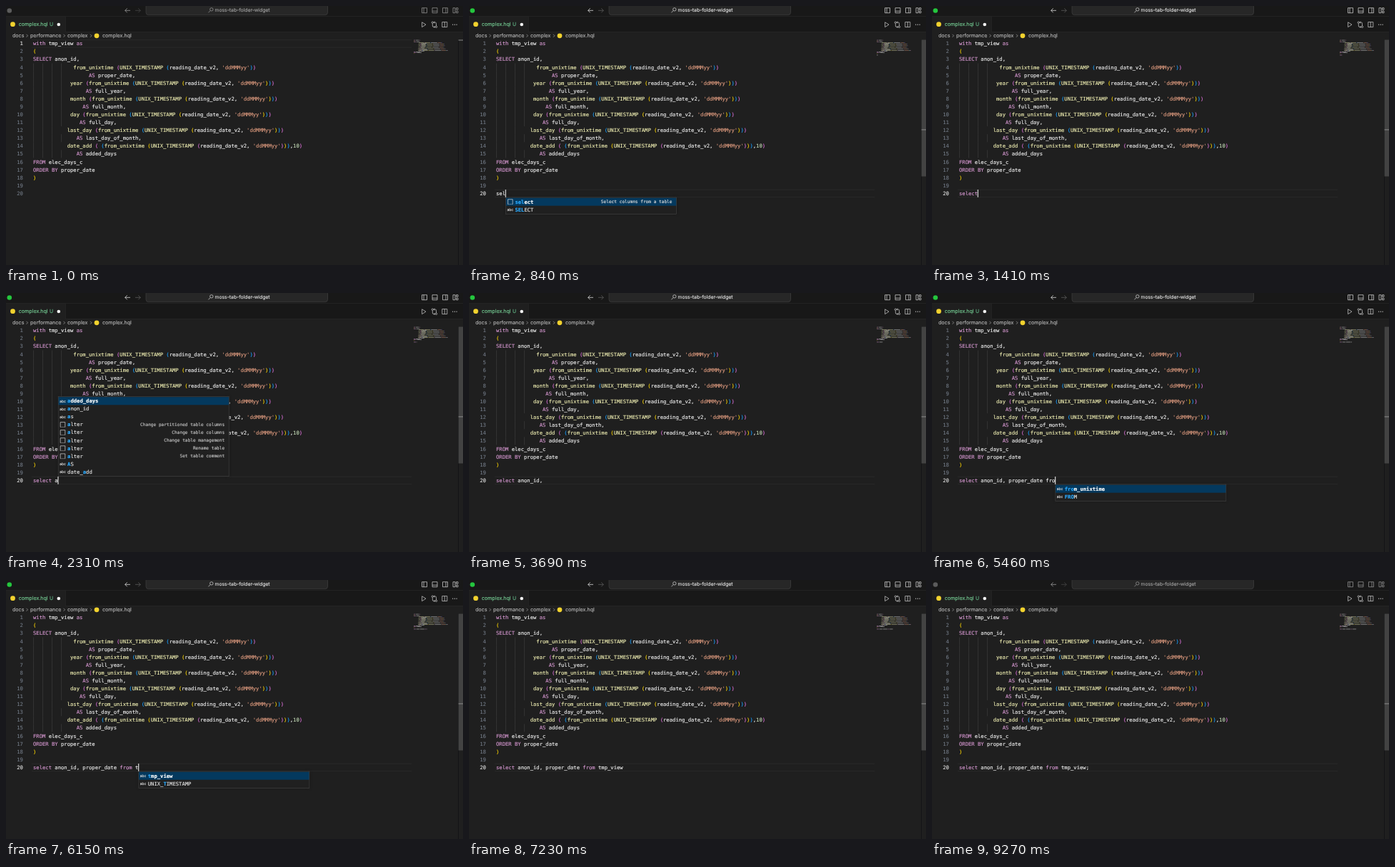
An HTML page with a canvas for the animation above (9.33 s loop, 640 by 364 pixels).

```html
<!DOCTYPE html>
<html lang="en">
<head>
<meta charset="utf-8">
<title>Query editor</title>
<style>
html, body { margin: 0; width: 100%; height: 100%; overflow: hidden; background: #1f1f1f; }
canvas { display: block; width: 640px; height: 364px; }
</style>
</head>
<body>
<canvas id="stage" width="640" height="364"></canvas>
<script>
const canvas = document.getElementById('stage');
const ctx = canvas.getContext('2d');
const LOOP = 9330;
const MONO = '"DejaVu Sans Mono", monospace';
const SANS = 'Inter, sans-serif';
const SIZE = 7.2, CHAR = 4.334, LEFT = 38, TOP = 52.8, ROW = 11.08;
const POPUP_WIDTH = 239;

const C = {
  editor: '#1f1f1f', bar: '#181818', line: '#2b2b2b', plain: '#ececec', keyword: '#d094cb',
  call: '#ecebb0', string: '#d8977c', number: '#c0d8b4', match: '#2aaaff', picked: '#04395e'
};
const BRACKETS = ['#ffd700', '#da70d6', '#179fff'];
const KEYWORDS = /^(with|as|select|from|order|by)$/i;

const unix = "(UNIX_TIMESTAMP (reading_date_v2, 'ddMMMyy'))";
const pad = (n, s) => ' '.repeat(n) + s;
const code = [
  'with tmp_view as', '(', 'SELECT anon_id,',
  pad(13, `from_unixtime ${unix}`), pad(18, 'AS proper_date,'),
  pad(12, `year (from_unixtime ${unix})`), pad(17, 'AS full_year,'),
  pad(12, `month (from_unixtime ${unix})`), pad(16, 'AS full_month,'),
  pad(12, `day (from_unixtime ${unix})`), pad(15, 'AS full_day,'),
  pad(11, `last_day (from_unixtime ${unix})`), pad(14, 'AS last_day_of_month,'),
  pad(11, `date_add ( (from_unixtime ${unix}),10)`), pad(14, 'AS added_days'),
  'FROM elec_days_c', 'ORDER BY proper_date', ')', ''
];

const completions = [
  ['added_days'], ['anon_id'], ['as'],
  ['alter', 'Change partitioned table columns'], ['alter', 'Change table columns'],
  ['alter', 'Change table management'], ['alter', 'Rename table'], ['alter', 'Set table comment'],
  ['AS'], ['date_add'], ['from_unixtime'], ['full_day'], ['full_month'], ['full_year'], ['FROM'],
  ['proper_date'], ['select', 'Select columns from a table'], ['SELECT'],
  ['tmp_view'], ['UNIX_TIMESTAMP']
];

// time, typed text, suggestions open
const edits = [
  [75, '', 0], [480, 's', 1], [660, 'se', 1], [810, 'sel', 1], [930, 'sele', 1],
  [1050, 'selec', 1], [1170, 'select', 1], [1400, 'select', 0], [1830, 'select ', 0],
  [2100, 'select a', 1], [2400, 'select an', 1], [2730, 'select anon_id', 0],
  [3180, 'select anon_id,', 0], [3870, 'select anon_id, ', 0],
  [3990, 'select anon_id, p', 1], [4230, 'select anon_id, pr', 1],
  [4740, 'select anon_id, proper_date', 0], [4980, 'select anon_id, proper_date ', 0],
  [5160, 'select anon_id, proper_date f', 1], [5280, 'select anon_id, proper_date fr', 1],
  [5430, 'select anon_id, proper_date fro', 1], [5550, 'select anon_id, proper_date from', 1],
  [5670, 'select anon_id, proper_date from ', 0], [6120, 'select anon_id, proper_date from t', 1],
  [6360, 'select anon_id, proper_date from tm', 1],
  [6690, 'select anon_id, proper_date from tmp_view', 0],
  [7600, 'select anon_id, proper_date from tmp_view;', 0]
];

const ramp = (t, a, b) => Math.min(1, Math.max(0, (t - a) / (b - a)));
const mix = (a, b, k) => `rgb(${a.map((v, i) => Math.round(v + (b[i] - v) * k))})`;
const gray = v => [v, v, v];
const rowY = i => TOP + i * ROW;

function rect(x, y, w, h, color) {
  ctx.fillStyle = color;
  ctx.fillRect(x, y, w, h);
}

function dot(x, y, r, color) {
  ctx.fillStyle = color;
  ctx.beginPath();
  ctx.arc(x, y, r, 0, Math.PI * 2);
  ctx.fill();
}

function stroke(path, color, width = 0.7) {
  ctx.strokeStyle = color;
  ctx.lineWidth = width;
  ctx.stroke(new Path2D(path));
}

// Large font under a small scale keeps fractional advances; the thin outline adds weight.
function text(str, x, y, color, { size = SIZE, family = MONO, weight = 400, align = 'left' } = {}) {
  ctx.save();
  ctx.translate(x, y);
  ctx.scale(0.1, 0.1);
  ctx.font = `${weight} ${size * 10}px ${family}`;
  ctx.textRendering = 'geometricPrecision';
  ctx.textAlign = align;
  ctx.lineJoin = 'round';
  ctx.lineWidth = 1.6;
  ctx.fillStyle = ctx.strokeStyle = color;
  ctx.fillText(str, 0, 0);
  ctx.strokeText(str, 0, 0);
  ctx.restore();
}

function tokenize(lines) {
  let depth = 0;
  return lines.map(line => [...line.matchAll(/'[^']*'|\w+|[()]|[^\s\w()']+/g)].map(m => {
    const str = m[0];
    let color = C.plain;
    if (str === '(') color = BRACKETS[depth++ % 3];
    else if (str === ')') color = BRACKETS[--depth % 3];
    else if (str[0] === "'") color = C.string;
    else if (KEYWORDS.test(str)) color = C.keyword;
    else if (/^\d+$/.test(str)) color = C.number;
    else if (line.startsWith(' (', m.index + str.length)) color = C.call;
    return { str, col: m.index, color };
  }));
}

function matchLetters(label, word) {
  for (let start = 0; start < label.length; start++) {
    if (start && label[start - 1] !== '_') continue;
    const found = [];
    for (let i = start; i < label.length && found.length < word.length; i++) {
      if (label[i].toLowerCase() === word[found.length]) found.push(i);
      else if (i === start) break;
    }
    if (found.length === word.length) return found;
  }
  return null;
}

function drawLayoutIcon(x, kind, color) {
  if (kind === 3) {
    stroke(`M${x - 3.5} 2.7h3v7h-3zM${x + 1} 2.7h2.5v2.5h-2.5zM${x + 1} 7.2h2.5v2.5h-2.5z`, color);
    return;
  }
  const divider = [`M${x - 1} 2.7v7`, `M${x - 3.5} 7.2h7`, `M${x + 1} 2.7v7`][kind];
  stroke(`M${x - 3.5} 2.7h7v7h-7z${divider}`, color);
}

function drawHeader(active) {
  rect(0, 0, 640, 36.5, C.bar);
  rect(0, 14.4, 640, 0.6, C.line);
  dot(4.8, 6.5, 3.3, mix(gray(92), [36, 198, 62], active));

  const tone = mix(gray(158), gray(222), active);
  stroke('M174 6.3h-7.3m3-3l-3 3l3 3', tone, 0.8);
  stroke('M181 6.3h7.3m-3-3l3 3l-3 3', mix(gray(70), gray(92), active), 0.8);
  ctx.beginPath();
  ctx.roundRect(196, -3, 254.5, 15.6, 3.5);
  ctx.fillStyle = '#272727';
  ctx.fill();
  ctx.strokeStyle = '#414141';
  ctx.lineWidth = 0.7;
  ctx.stroke();
  stroke('M283.5 9.3l2.5-2.8M290 4.8a2.2 2.2 0 1 1-4.4 0a2.2 2.2 0 1 1 4.4 0', tone);
  text('moss-tab-folder-widget', 292.5, 8.4, tone, { size: 6.8, family: SANS });
  [586, 600.5, 615, 629.5].forEach((x, i) => drawLayoutIcon(x, i, tone));

  rect(0, 15, 83, 22, C.editor);
  rect(83, 15, 0.6, 21.5, C.line);
  rect(83, 36, 557, 0.6, C.line);
  dot(9.5, 25.7, 3.4, '#f2d22e');
  text('complex.hql', 17.8, 28.4, '#73c991', { size: 7.1, family: SANS });
  text('U', 61, 28.4, '#5fae80', { size: 7, family: SANS });
  dot(73.8, 26, 2.3, '#f8f8f8');

  const tool = '#d4d4d4';
  stroke('M582.6 22.8l5.4 3.4l-5.4 3.4z', tool);
  stroke('M597.3 24.5v3.5q0 1.5 1.5 1.5h2m-1.3-1.3l1.3 1.3l-1.3 1.3M602.5 28v-3.5q0-1.5-1.5-1.5h-2m1.3-1.3l-1.3 1.3l1.3 1.3', tool);
  ctx.lineWidth = 0.7;
  for (const [x, y] of [[597.3, 23.2], [602.5, 29.3]]) {
    ctx.beginPath();
    ctx.arc(x, y, 1.2, 0, Math.PI * 2);
    ctx.stroke();
  }
  stroke('M610.8 22.6h7v7h-7zM614.3 22.6v7', tool);
  [625.7, 628.4, 631.1].forEach(x => dot(x, 26.2, 0.65, tool));

  const crumb = { size: 7.1, family: SANS };
  [['docs', 9], ['performance', 34], ['complex', 86], ['complex.hql', 135]]
    .forEach(([name, x]) => text(name, x, 44.4, '#b0b0b0', crumb));
  [28.5, 80.5, 118].forEach(x => stroke(`M${x} 39.8l2 2l-2 2`, '#a8a8a8'));
  dot(127, 41.8, 3.4, '#f2d22e');
}

function drawCode(tokens, lines, current) {
  const y = rowY(current);
  rect(36, y - 5.6, 532, 0.9, '#2a2a2a');
  rect(36, y + 4.9, 532, 0.9, '#2a2a2a');
  lines.forEach((line, i) => {
    const guides = Math.min(4, Math.floor(line.search(/\S/) / 3));
    for (let g = 0; g < guides; g++) {
      rect(LEFT + g * 3 * CHAR, rowY(i) - ROW / 2, 0.6, ROW, '#404040');
    }
    text(String(i + 1), 23.9, rowY(i) + 2.5, i === current ? '#e0e0e0' : '#6e7681', { align: 'right' });
    tokens[i].forEach(k => text(k.str, LEFT + k.col * CHAR, rowY(i) + 2.5, k.color));
  });
}

function drawMinimap(tokens) {
  ctx.globalAlpha = 0.6;
  tokens.forEach((line, i) => line.forEach(k =>
    rect(571 + k.col * 0.55, 47.7 + i * 1.1, k.str.length * 0.55, 0.75, k.color)));
  ctx.globalAlpha = 1;
}

function drawScrollbar(current) {
  rect(633, 47.5, 0.6, 317, '#0c0e12');
  if (current) rect(633.6, 47.5, 6.4, 192, '#434343');
  rect(633.6, current ? 173.4 : 47.5, 6.4, 1, '#8c8c8c');
}

function drawPopup(x, word) {
  const rows = completions
    .map(([label, detail]) => ({ label, detail, letters: matchLetters(label, word) }))
    .filter(r => r.letters);
  const height = rows.length * ROW + 1.4;
  const below = rowY(19) + 5.6;
  const y = below + height > 364 ? rowY(19) - 5.6 - height : below;

  ctx.save();
  ctx.shadowColor = 'rgba(0,0,0,0.36)';
  ctx.shadowBlur = 5;
  rect(x, y, POPUP_WIDTH, height, '#202020');
  ctx.restore();

  rows.forEach(({ label, detail, letters }, i) => {
    const mid = y + 0.7 + (i + 0.5) * ROW;
    const weight = i ? 400 : 700;
    if (!i) rect(x, mid - ROW / 2, POPUP_WIDTH, ROW, C.picked);
    if (detail) {
      stroke(`M${x + 3} ${mid + 3.4}v-6.8h6.6v6.8`, '#d8d8d8');
      ctx.setLineDash([1, 0.8]);
      stroke(`M${x + 3} ${mid + 3.4}h6.6`, '#d8d8d8');
      ctx.setLineDash([]);
      text(detail, x + POPUP_WIDTH - 6, mid + 2, i ? '#c0c0c0' : '#dcdcdc', { size: 6.13, align: 'right' });
    } else {
      text('abc', x + 2, mid + 1.8, '#d8d8d8', { size: 4.9, family: SANS });
    }
    [...label].forEach((ch, n) => {
      const hit = letters.includes(n);
      text(ch, x + 12.9 + n * CHAR, mid + 2.4, hit ? C.match : i ? '#e2e2e2' : '#ffffff',
        { weight: hit ? 700 : weight });
    });
  });
  ctx.strokeStyle = '#454545';
  ctx.lineWidth = 0.6;
  ctx.strokeRect(x, y, POPUP_WIDTH, height);
}

function draw(t) {
  const active = ramp(t, 30, 300) - ramp(t, 8880, 9270);
  const edit = edits.filter(e => e[0] <= t).pop();
  const typed = edit ? edit[1] : '';
  const current = edit ? 19 : 0;
  const lines = [...code, typed];
  const tokens = tokenize(lines);

  rect(0, 0, 640, 364, C.editor);
  drawHeader(active);
  drawCode(tokens, lines, current);
  drawMinimap(tokens);
  drawScrollbar(current);
  if (!edit) return;

  const caret = LEFT + typed.length * CHAR;
  if (edit[2]) drawPopup(caret + 0.5, typed.split(' ').pop());
  if ((t - edit[0]) % 1000 < 500 && t < 9240) rect(caret - 0.3, rowY(19) - 5.3, 1.2, 10.8, '#d8d8d8');
}

const start = performance.now();
function tick() {
  draw((performance.now() - start) % LOOP);
  requestAnimationFrame(tick);
}
tick();
</script>
</body>
</html>
```
